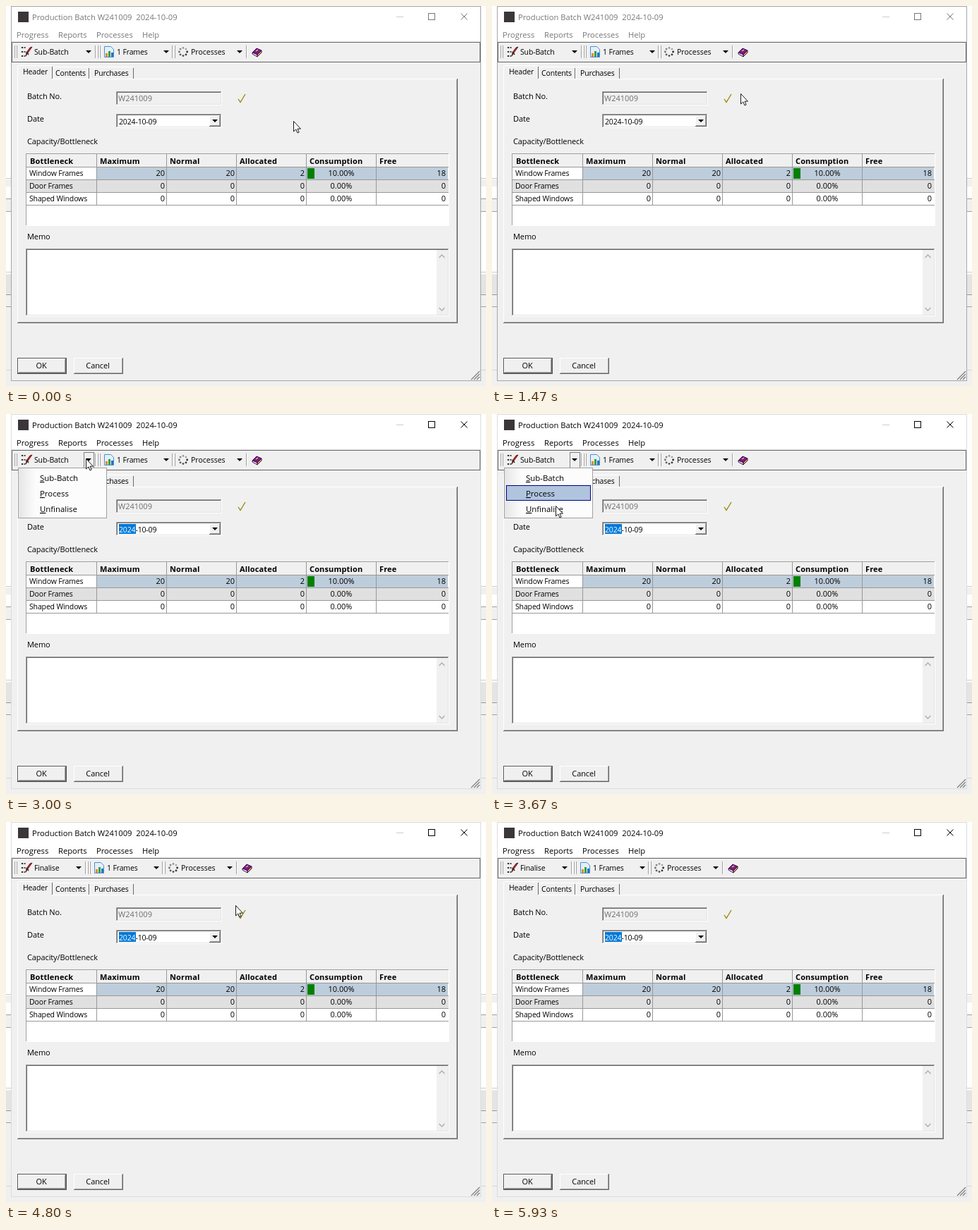
These frames come from a looping animation (680x539 px, 6.4 s). An HTML page:

```html
<!DOCTYPE html>
<html lang="en">
<head>
<meta charset="utf-8">
<title>Production Batch</title>
<style>
html, body { margin: 0; width: 100%; height: 100%; overflow: hidden; background: #fff; }
svg { display: block; width: 680px; height: 539px; font: 10.5px "Open Sans", "Noto Sans", sans-serif;
  --ink: #777; --edge: #a6a6a6; }
svg.active { --ink: #000; --edge: #dcdcdc; }
text { white-space: pre; }
rect, line { shape-rendering: crispEdges; }
.ink { fill: var(--ink); }
.ui { font-size: 11.2px; }
.tight { letter-spacing: -.15px; }
.label { font-size: 11px; letter-spacing: -.1px; }
.head { font-size: 11px; font-weight: bold; letter-spacing: .15px; }
.num { font-size: 11px; }
.popup { font-size: 11.4px; }
.off { display: none; }
</style>
</head>
<body>
<svg id="stage" viewBox="0 0 680 539"></svg>
<script>
const stage = document.getElementById('stage');

const box = (x, y, w, h, fill, extra = '') =>
  `<rect x="${x}" y="${y}" width="${w}" height="${h}" fill="${fill}" ${extra}/>`;
const frame = (x, y, w, h, fill, stroke) =>
  box(x + .5, y + .5, w - 1, h - 1, fill, `stroke="${stroke}"`);
const hline = (x, y, w, c) => box(x, y, w, 1, c);
const vline = (x, y, h, c) => box(x, y, 1, h, c);
const text = (x, y, s, cls = 'tight', extra = '') =>
  `<text x="${x}" y="${y}" class="${cls}" ${extra}>${s}</text>`;
const path = (d, fill, stroke = 'none', w = 1) =>
  `<path d="${d}" fill="${fill}" stroke="${stroke}" stroke-width="${w}"/>`;
const group = (id, s, cls = '') => `<g id="${id}" class="${cls}">${s}</g>`;
const arrow = (x, y = 63) => path(`M${x - 4} ${y}h8l-4 4z`, '#000');

// Two-tone bevel: outer and inner colours for top/left and bottom/right.
const bevel = (x, y, w, h, fill, [a, b, c, d]) =>
  box(x, y, w, h, fill) +
  hline(x, y, w, a) + vline(x, y, h, a) +
  hline(x + 1, y + 1, w - 2, b) + vline(x + 1, y + 1, h - 2, b) +
  hline(x, y + h - 1, w, c) + vline(x + w - 1, y, h, c) +
  hline(x + 1, y + h - 2, w - 2, d) + vline(x + w - 2, y + 1, h - 2, d);
const SUNKEN = ['#a0a0a0', '#696969', '#fff', '#e3e3e3'];
const SHALLOW = ['#a0a0a0', '#fff', '#fff', '#fff'];
const RAISED = ['#fff', '#f0f0f0', '#696969', '#a0a0a0'];

function backdrop() {
  return box(0, 0, 680, 539, '#fff') +
    hline(0, 244, 680, '#c8c8c8') + box(0, 246, 680, 10, '#f0f0f0') +
    box(0, 273, 680, 18, '#f0f0f0') + hline(0, 273, 680, '#a0a0a0') + hline(0, 291, 680, '#a0a0a0') +
    hline(0, 377, 680, '#ccc') + box(0, 380, 680, 159, '#f0f0f0') +
    box(0, 381, 680, 27, '#e4e4e4') + hline(0, 409, 680, '#909090') + hline(0, 426, 680, '#a0a0a0') +
    hline(0, 516, 680, '#d5d5d5');
}

function chrome() {
  const menus = [[15, 'Progress'], [74, 'Reports'], [128, 'Processes'], [193, 'Help']];
  return box(7, 0, 666, 532, 'var(--edge)') + box(8, 1, 664, 530, '#f0f0f0') + box(8, 1, 664, 49, '#fff') +
    box(17, 8, 15, 15, '#3b3639') +
    text(37, 20, 'Production Batch W241009  2024-10-09', 'ink ui') +
    hline(553, 15, 10, '#ccc') +
    frame(598, 10, 10, 10, 'none', 'var(--ink)') +
    path('M644.5 10.5l9 9M653.5 10.5l-9 9', 'none', 'var(--ink)') +
    menus.map(([x, s]) => text(x, 45, s, 'ink ui')).join('') +
    [4, 8, 12].map(n => path(`M${671 - n} 530L671 ${530 - n}`, 'none', '#808080', 1.3)).join('');
}

const grip = x => vline(x, 56, 18, '#fff') + vline(x + 1, 56, 18, '#a0a0a0');
const split = x => vline(x, 56, 18, '#a0a0a0') + vline(x + 1, 56, 18, '#fff');

function toolbar() {
  let dots = '';
  for (let i = 0; i < 8; i++) {
    const a = i * Math.PI / 4, shade = 40 + i * 18;
    dots += `<circle cx="${251 + 5.6 * Math.cos(a)}" cy="${65 + 5.6 * Math.sin(a)}" r="1.4" fill="rgb(${shade},${shade},${shade})"/>`;
  }
  const list = [58, 64, 70].map(y => box(22, y, 2, 2, '#222') + box(25, y, 3, 2, '#777')).join('') +
    path('M37 58l-5 7-4 6 1-5 5-7z', '#d22', '#511', .9) + path('M29 65l3 4', 'none', '#222', 1.4);
  const chart = path('M139.5 57.5h9l4 4v11h-13z', '#e3effa', '#4b8fd0') +
    box(141, 67, 3, 5, '#e58a1f') + box(145, 64, 3, 8, '#35a045') + box(149, 66, 3, 6, '#2674c8');
  const book = path('M349 66l6-6 7 3-6 6z', '#7b1a8c', '#3b0748') +
    path('M349 66v2l7 4v-3z', '#fff', '#3b0748') + path('M356 69l6-6v3l-6 6z', '#d9b23c', '#3b0748') +
    path('M354 64l3-2', 'none', '#f3d24a', 1.3);
  return frame(8, 51, 664, 29, '#f0f0f0', '#646464') + grip(11) + grip(14) +
    group('hover', frame(17, 54, 94, 23, '#b6c7e0', '#000080') + frame(110, 54, 15, 23, '#b6c7e0', '#000080'), 'off') +
    group('pressed', frame(110, 54, 15, 23, '#f0f0f0', '#808080'), 'off') +
    list + text(40, 69, 'Sub-Batch', 'tight', 'id="action"') +
    group('tools', arrow(117) + split(126) + grip(129) + grip(132) +
      chart + text(157, 69, '1 Frames') + arrow(227) + split(235) + grip(238) +
      dots + text(262, 69, 'Processes', '') + arrow(331) + split(340) + book);
}

function page() {
  const tab = (x, y, w) => box(x, y, w, 104 - y, '#f0f0f0') + hline(x + 1, y, w - 2, '#fff') +
    vline(x, y + 1, 103 - y, '#fff') + vline(x + w - 1, y + 2, 101 - y, '#696969');
  return bevel(16, 103, 624, 347, '#f0f0f0', RAISED) +
    tab(67, 86, 51) + tab(118, 86, 63) + hline(65, 103, 574, '#fff') +
    tab(16, 84, 50) + box(17, 103, 47, 2, '#f0f0f0') +
    text(24, 97, 'Header') + text(70, 99, 'Contents') + text(125, 99, 'Purchases') +
    text(30, 132, 'Batch No.', 'label') + text(30, 164, 'Date', 'label') +
    text(30, 196, 'Capacity/Bottleneck', 'label') + text(30, 331, 'Memo', 'label') +
    bevel(156, 121, 150, 20, '#f0f0f0', SUNKEN) + text(159, 135, 'W241009', 'num', 'fill="#6d6d6d"') +
    path('M329 132l3 4.5 7-11.5', 'none', '#8f8a00', 1.3) +
    bevel(156, 153, 150, 20, '#fff', SUNKEN) + bevel(288, 155, 16, 16, '#f0f0f0', RAISED) + arrow(296, 161) +
    group('year', box(160, 156, 24, 14, '#0078d7'), 'off') +
    text(160, 168, '<tspan id="digits">2024</tspan>-10-09');
}

function table() {
  const heads = ['Bottleneck', 'Maximum', 'Normal', 'Allocated', 'Consumption', 'Free'];
  const rows = [['Window Frames', 20, 20, 2, '10.00%', 18],
    ['Door Frames', 0, 0, 0, '0.00%', 0], ['Shaped Windows', 0, 0, 0, '0.00%', 0]];
  const col = i => 29 + i * 99;
  let s = bevel(28, 209, 600, 103, '#fff', SHALLOW) + box(29, 210, 598, 18, '#f0f0f0') +
    box(128, 229, 498, 17, '#becddb') + box(29, 247, 598, 17, '#e0e0e0') + box(427, 230, 10, 15, '#008000');
  for (let y = 228; y < 283; y += 18) s += hline(29, y, 598, '#989898');
  for (let i = 1; i < 6; i++) s += vline(col(i), 210, 73, '#989898');
  heads.forEach((h, i) => s += text(col(i) + 5, 224, h, 'head'));
  rows.forEach((r, j) => r.forEach((v, i) => {
    const y = 241 + 18 * j;
    if (!i) s += text(33, y, v);
    else if (i == 4) s += text(475, y, v, 'num', 'text-anchor="middle"');
    else s += text(i == 5 ? 623 : col(i + 1) - 2, y, v, 'num', 'text-anchor="end"');
  }));
  return s;
}

function footer() {
  return bevel(28, 344, 600, 96, '#fff', SUNKEN) + box(610, 346, 16, 92, '#f0f0f0') +
    path('M613.5 357l4-4 4 4M613.5 428l4 4 4-4', 'none', '#b0b0b0', 1.5) +
    frame(16, 499, 70, 23, '#f0f0f0', '#555') + bevel(17, 500, 68, 21, '#f0f0f0', RAISED) +
    bevel(96, 499, 70, 23, '#f0f0f0', RAISED) +
    text(50, 514, 'OK', 'label', 'text-anchor="middle"') + text(130, 514, 'Cancel', 'label', 'text-anchor="middle"');
}

function popup() {
  const items = ['Sub-Batch', 'Process', 'Unfinalise'];
  return `<linearGradient id="gutter"><stop stop-color="#e6e6e6"/><stop offset="1" stop-color="#fcfcfc"/></linearGradient>` +
    frame(17, 76, 126, 72, '#fcfcfc', '#a0a0a0') + box(18, 77, 24, 70, 'url(#gutter)') +
    group('pick', frame(20, 79, 120, 22, '#b0c4de', '#000080')) +
    items.map((s, i) => text(48, 95 + 22 * i, `<tspan text-decoration="underline">${s[0]}</tspan>${s.slice(1)}`, 'popup')).join('');
}

stage.innerHTML = backdrop() + chrome() + toolbar() + page() + table() + footer() +
  group('popup', popup(), 'off') +
  group('pointer', path('M.5.5V15L3.8 11.9 6 17 8.2 16 6 11.2H10.4z', '#fff', '#000', .9));

// Pointer route: step, x, y
const route = [
  [0, 407, 163], [2, 372, 170], [5, 270, 166], [7, 230, 160], [10, 310, 152], [12, 345, 154],
  [14, 380, 145], [16, 384, 128], [18, 366, 115], [20, 353, 126], [22, 352, 124], [23, 352, 124],
  [25, 300, 112], [28, 160, 96], [30, 89, 88], [31, 97, 82], [32, 107, 71], [33, 107, 71],
  [35, 106, 66], [36, 106, 66], [38, 112, 64], [39, 112, 64], [40, 113, 63], [47, 113, 63],
  [48, 113, 70], [51, 100, 95], [54, 92, 119], [55, 90, 130], [62, 90, 130], [64, 100, 138],
  [66, 150, 140], [69, 260, 130], [72, 325, 118], [73, 325, 118], [75, 334, 150], [78, 300, 235],
  [83, 207, 326], [86, 160, 430], [88, 124, 506], [96, 124, 506]
];

function pointerAt(step) {
  const i = route.findIndex(p => p[0] > step);
  const [k0, x0, y0] = route[i - 1], [k1, x1, y1] = route[i];
  const f = (step - k0) / (k1 - k0);
  return [x0 + (x1 - x0) * f, y0 + (y1 - y0) * f].map(Math.round);
}

const LOOP = 6400, STEP = 200 / 3;
const el = id => document.getElementById(id);
const show = (id, on) => el(id).classList.toggle('off', !on);
let last = -1;

function render(t) {
  const step = Math.floor((Math.floor(t / 10) * 10 + 4) / STEP);
  if (step === last) return;
  last = step;
  const active = step >= 44, open = step >= 45 && step < 63, done = step >= 66;
  const item = step < 51 ? -1 : step < 53 ? 0 : step < 57 ? 1 : 2;
  stage.classList.toggle('active', active);
  show('year', active);
  el('digits').setAttribute('fill', active ? '#fff' : '#000');
  show('hover', step >= 34 && step < 45);
  show('pressed', open);
  show('popup', open);
  show('pick', item >= 0);
  el('pick').setAttribute('transform', `translate(0 ${22 * Math.max(item, 0)})`);
  el('action').textContent = done ? 'Finalise' : 'Sub-Batch';
  el('tools').setAttribute('transform', `translate(${done ? -14 : 0} 0)`);
  show('pointer', step < 89);
  el('pointer').setAttribute('transform', `translate(${pointerAt(step)})`);
}

const start = performance.now();
function tick() {
  render((performance.now() - start) % LOOP);
  requestAnimationFrame(tick);
}
tick();
</script>
</body>
</html>
```
